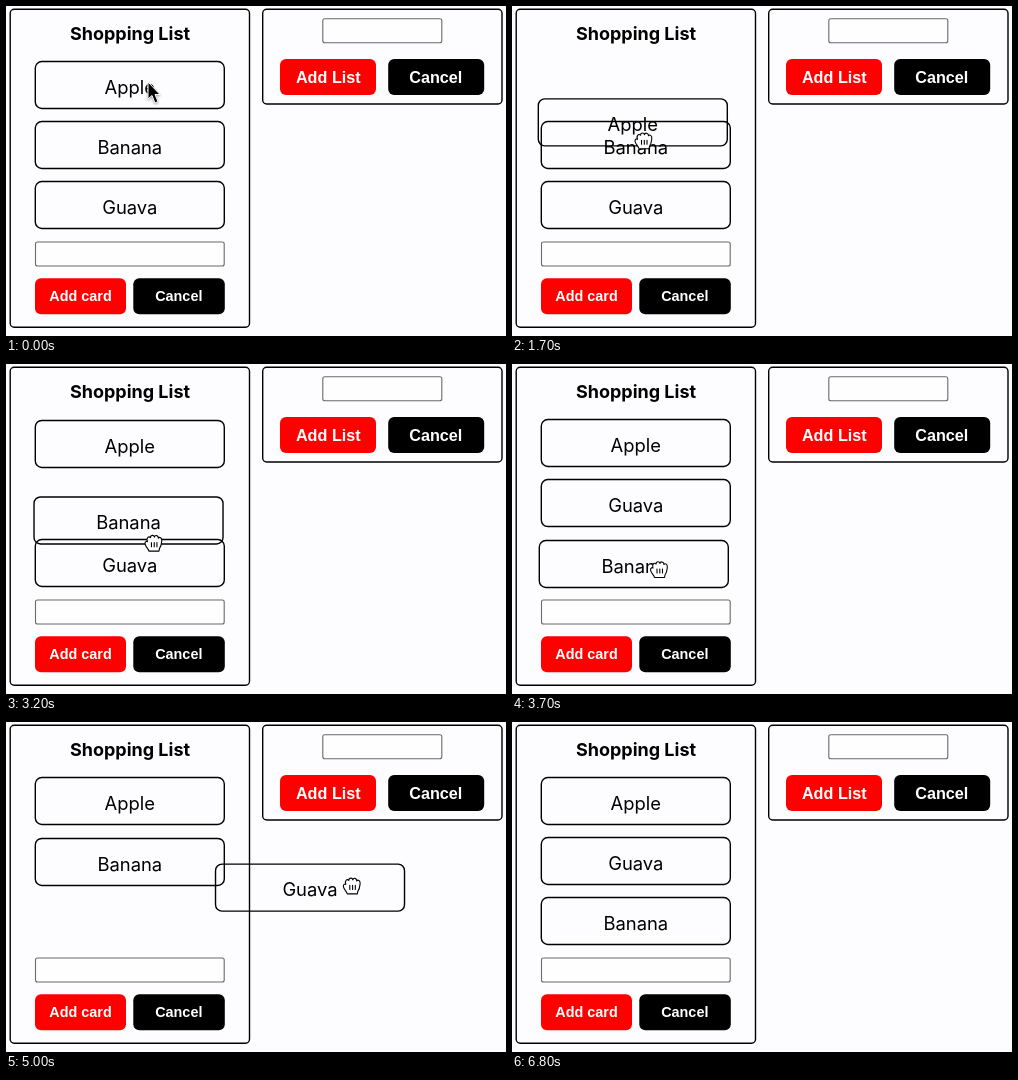
An HTML page that plays this animation: 500 by 330 pixels, repeating every 6.9 s.

```html
<!DOCTYPE html>
<html lang="en">
<head>
<meta charset="utf-8">
<title>Shopping List</title>
<style>
  html, body { margin: 0; width: 100%; height: 100%; overflow: hidden; background: #fdfcfe; }
  svg { display: block; width: 500px; height: 330px; }
  text { text-anchor: middle; }
  .panel, .card rect { fill: none; stroke: #000; stroke-width: 1.4; }
  .field { fill: #fefefe; stroke: #6a6a6a; stroke-width: 1.1; }
  .title { font: 700 18px Inter, sans-serif; }
  .card text { font: 400 18.4px Inter, sans-serif; }
  .button text { font: 700 14.4px "Liberation Sans", Arial, sans-serif; fill: #fff; }
  .button.big text { font-size: 16.2px; }
  .add { fill: #f00; }
  .hand { fill: #fff; stroke: #000; stroke-width: 1.1; stroke-linejoin: round; stroke-linecap: round; }
  .arrow { fill: #000; stroke: #fff; stroke-width: 1; filter: drop-shadow(0 1px 1px #0006); }
</style>
</head>
<body>
<svg viewBox="0 0 500 330">
  <rect class="panel" x="4.2" y="3.2" width="239.3" height="318" rx="4"/>
  <text class="title" x="124" y="33.5">Shopping List</text>
  <rect class="field" x="29.5" y="236" width="188.7" height="24" rx="2"/>
  <g class="button">
    <rect class="add" x="29" y="272.3" width="91" height="36" rx="6"/>
    <text x="74.5" y="295">Add card</text>
    <rect x="127.3" y="272.3" width="91.5" height="36" rx="6"/>
    <text x="172.8" y="295">Cancel</text>
  </g>

  <rect class="panel" x="256.7" y="3.2" width="239.3" height="94.8" rx="4"/>
  <rect class="field" x="316.8" y="12.8" width="119" height="24" rx="2"/>
  <g class="button big">
    <rect class="add" x="274" y="53" width="96" height="36" rx="6"/>
    <text x="322.3" y="77">Add List</text>
    <rect x="382.2" y="53" width="96" height="36" rx="6"/>
    <text x="429.8" y="77">Cancel</text>
  </g>

  <g id="cards"></g>

  <g id="cursor">
    <path id="arrow" class="arrow" d="M0 0V17L4 13.5 7 21 10 19.5 7 12.5H12Z"/>
    <path id="open" class="hand" d="M-4 11C-5 8-8 5-9 2C-9.5 0-7-1-5.5 2L-7-6C-7.5-9-4.5-9.5-4-7L-3-2V-10C-3-12.5 0-12.5 0-10L.3-2 1.5-9.5C2-12 4.7-11.3 4.4-9L3.6-2 6-6.5C7-8.5 9.5-7.5 8.8-5C8-1 8 3 6 6L5 11ZM-1.5 2.5v4.5M1.2 2.5v4.5M3.8 2.5v4.5"/>
    <path id="fist" class="hand" d="M-4.5 8.5C-5 6-8 4-8.5 1C-8.5-1.5-6.5-1.5-6-1C-7.5-5-4.5-7-3-5C-3-8 .5-8 1-5.5C1.5-8 5-7.5 5-4.5C6-6 8.7-5 8.3-1.5C8 2 7.5 4 6 6L5.5 8.5ZM-2 0v4M.8 0v4M3.5 0v4"/>
  </g>
</svg>
<script>
  const TICK = 100, LOOP = 6900;
  const LAG = 1;        // ticks a dragged card trails the pointer
  const SETTLE = 0.75;  // share of the way to its slot a free card covers per tick
  const ARRIVE = 10, LEAVE = 61;
  const $ = id => document.getElementById(id);

  const names = ['Apple', 'Banana', 'Guava'];
  const slot = i => ({ x: 29, y: 55 + 60 * i });

  // Pointer strokes: start tick, end tick, target x, target y, ease-out power.
  const strokes = [
    [2, 7, 137, 134], [8, 10, 136, 78], [14.6, 19.4, 130, 153], [23, 25, 149, 84],
    [28, 35.5, 147, 205], [38, 42, 153, 135], [43, 45, 199, 143, 1],
    [45, 51, 350, 164], [51, 54.5, 399, 154], [LEAVE, 67, 515, 350],
  ];

  const drags = [
    { name: 'Apple', from: 13, to: 23 },
    { name: 'Banana', from: 28, to: 38 },
    { name: 'Guava', from: 43, to: LEAVE },
  ];

  // Tick at which the cards in slots i and i + 1 trade places.
  const swaps = { 18: 0, 30: 0, 33: 1, 48: 1, [LEAVE + 1]: 1 };

  function pointer(tick) {
    let x = 142, y = 76;
    for (const [start, end, toX, toY, power = 2] of strokes) {
      const u = Math.min(1, Math.max(0, (tick - start) / (end - start)));
      const p = 1 - (1 - u) ** power;
      x += (toX - x) * p;
      y += (toY - y) * p;
    }
    return { x, y };
  }

  const dragAt = tick => drags.find(d => tick > d.from && tick <= d.to);

  // Replays the list from the start of the loop up to the given tick.
  function layout(tick) {
    const order = [...names];
    const cards = Object.fromEntries(names.map((name, i) => [name, slot(i)]));
    for (let t = 1; t <= tick; t++) {
      const drag = dragAt(t);
      if (t in swaps) {
        const i = swaps[t];
        [order[i], order[i + 1]] = [order[i + 1], order[i]];
      }
      order.forEach((name, i) => {
        if (drag?.name === name) return;
        const card = cards[name], home = slot(i);
        card.x += (home.x - card.x) * SETTLE;
        card.y += (home.y - card.y) * SETTLE;
      });
      if (drag) {
        const now = pointer(t - LAG), before = pointer(Math.max(drag.from, t - 1 - LAG));
        if (t - LAG > drag.from) {
          cards[drag.name].x += now.x - before.x;
          cards[drag.name].y += now.y - before.y;
        }
      }
    }
    return cards;
  }

  const move = (node, { x, y }) =>
    node.setAttribute('transform', `translate(${x.toFixed(2)} ${y.toFixed(2)})`);

  function draw(ms) {
    const tick = Math.floor(ms % LOOP / TICK);
    const cards = layout(tick);
    for (const name of names) move($(name), cards[name]);
    move($('cursor'), pointer(tick));
    const shape = tick < ARRIVE || tick > LEAVE ? 'arrow' : dragAt(tick) ? 'fist' : 'open';
    for (const id of ['arrow', 'open', 'fist']) {
      $(id).style.display = id === shape ? '' : 'none';
    }
  }

  $('cards').innerHTML = names.map(name => `<g class="card" id="${name}">
    <rect x=".3" y=".5" width="189" height="47" rx="6.5"/>
    <text x="94.8" y="32.6">${name}</text></g>`).join('');

  let begin;
  function frame(now) {
    begin ??= now;
    draw(now - begin);
    requestAnimationFrame(frame);
  }
  draw(0);
  requestAnimationFrame(frame);
</script>
</body>
</html>
```
